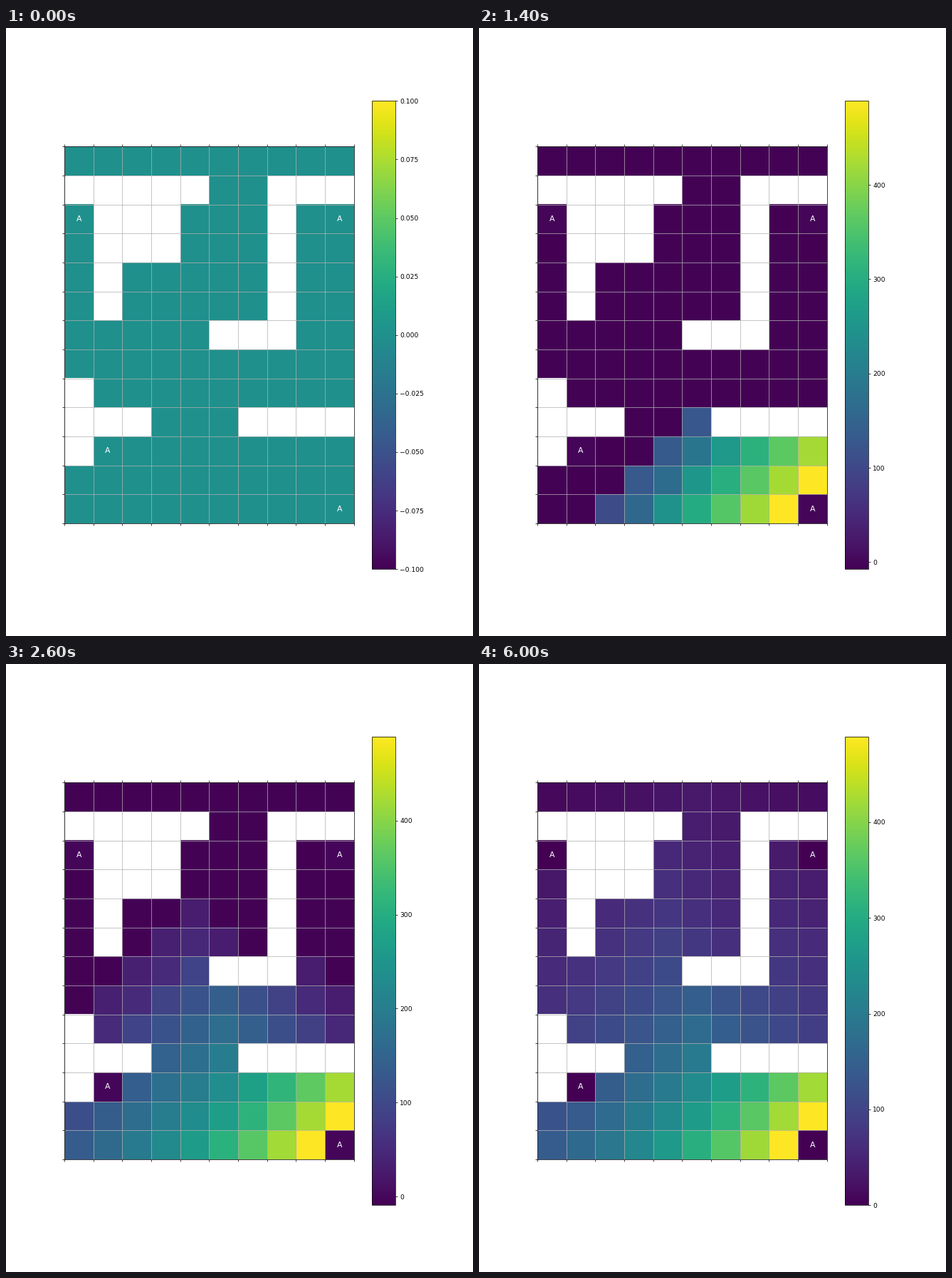
These frames come from a looping animation (656 px wide and 853 px high, 8000 ms). A matplotlib script:

```python
import numpy as np
import matplotlib.pyplot as plt
from matplotlib.animation import FuncAnimation

# '#' wall, 'G' goal, 'P' penalty exit
MAZE = [
    "..........",
    "#####..###",
    "P###...#.P",
    ".###...#..",
    ".#.....#..",
    ".#.....#..",
    ".....###..",
    "..........",
    "#.........",
    "###...####",
    "#P........",
    "..........",
    ".........G",
]
ROWS, COLS = len(MAZE), len(MAZE[0])
EXIT_REWARD = {"G": 500, "P": -70}
STEP_REWARD = -1
SUCCESS = 0.9
SLIP = (1 - SUCCESS) / 3
GAMMA = 0.88
MOVES = [(-1, 0), (0, 1), (1, 0), (0, -1)]
SWEEPS = 30
FRAMES, INTERVAL = 40, 200

CELLS = [(r, c) for r in range(ROWS) for c in range(COLS)]
EXITS = [(r, c) for r, c in CELLS if MAZE[r][c] in EXIT_REWARD]
WALLS = np.array([[ch == "#" for ch in row] for row in MAZE])


def move(r, c, dr, dc):
    """Neighbouring cell, or the same cell when the way is blocked."""
    nr, nc = r + dr, c + dc
    if 0 <= nr < ROWS and 0 <= nc < COLS and not WALLS[nr, nc]:
        return nr, nc
    return r, c


def sweep(values):
    """One synchronous step of value iteration."""
    new = np.zeros_like(values)
    for r, c in CELLS:
        if MAZE[r][c] != ".":
            continue
        gains = []
        for dr, dc in MOVES:
            nxt = move(r, c, dr, dc)
            reward = EXIT_REWARD.get(MAZE[nxt[0]][nxt[1]], STEP_REWARD)
            gains.append(reward + GAMMA * values[nxt])
        new[r, c] = SLIP * sum(gains) + (SUCCESS - SLIP) * max(gains)
    return new


history = [np.zeros((ROWS, COLS))]
for _ in range(SWEEPS):
    history.append(sweep(history[-1]))

DPI = 65.6
fig, ax = plt.subplots(figsize=(656 / DPI, 853 / DPI), dpi=DPI)
image = ax.imshow(np.ma.array(history[0], mask=WALLS), cmap="viridis",
                  vmin=-0.1, vmax=0.1, interpolation="nearest")
fig.colorbar(image, ax=ax)

ax.set_xticks(np.arange(COLS + 1) - 0.5)
ax.set_yticks(np.arange(ROWS + 1) - 0.5)
ax.tick_params(top=True, labelbottom=False, labelleft=False)
ax.grid(True)
for r, c in EXITS:
    ax.text(c, r, "A", color="white", fontsize=12, ha="center", va="center")


def draw(frame):
    values = history[min(frame, SWEEPS)]
    shown = np.ma.array(values, mask=WALLS)
    low, high = shown.min(), shown.max()
    if low == high:
        low, high = -0.1, 0.1
    image.set_data(shown)
    image.set_clim(low, high)
    return [image]


anim = FuncAnimation(fig, draw, frames=FRAMES, interval=INTERVAL,
                     repeat=True, repeat_delay=0, blit=False)
plt.show()
```
